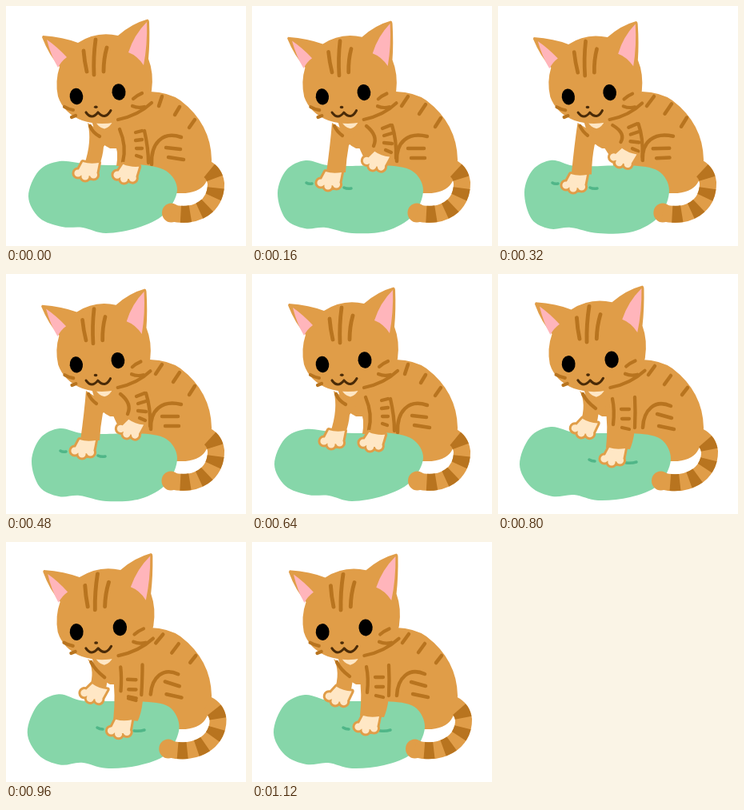
Recreate the animation shown at these times as an HTML page with a canvas. Size 300 by 300 pixels, loop 1.28 s.

```html
<!DOCTYPE html>
<html lang="en">
<head>
<meta charset="utf-8">
<title>Kneading kitten</title>
<style>
  html, body { margin: 0; width: 100%; height: 100%; overflow: hidden; background: #fff; }
  canvas { display: block; width: 300px; height: 300px; }
</style>
</head>
<body>
<canvas id="stage" width="300" height="300"></canvas>
<script>
const ctx = document.getElementById("stage").getContext("2d");
const FUR = "#e09d48", STRIPE = "#b8741f", CREAM = "#ffe7c5";
const PINK = "#ffb5bb", CUSHION = "#86d6a9", DENT = "#50b688", INK = "#000", MOUTH = "#4a2b08";
const STEP = 160;

// Each pose field has the same layout in every pose, so poses can be blended.
const rest = {
  cushion: "28 238 41 206 67 194 98 197 128 199 165 198 200 206 214 230 198 260 165 277 125 284 96 277 70 276 42 265",
  tail: "M206.5 258.5 C238 266 263 250 262.5 222 Q261 209 250 203",
  armL: "M102 146 Q108 168 98 198 L117 198 Q121 188 122 176 L130 165 Z",
  armR: "M136 165 Q141 185 138 200 L166 200 Q171 180 174 165 Z",
  pawL: "99 209 0",
  pawR: "148 212 0.1",
  marks: "M105 150 Q108 158 117 163 M142 154 Q151 175 146 195 M173 156 Q178 178 178 196 " +
    "M162 158 L170 156 M162 168 L170 167 M163 178 L170 178 M163 187 L169 189",
  back: "M195 113 L191 125 M217 126 L211 136 M236 142 L229 152",
  haunch: "M182 198 C181 172 195 156 219 164 M200 177 L218 179 M203 189 L222 192"
};
const pressLeft = {
  cushion: "32 234 43 205 67 193 94 199 122 200 165 199 200 206 214 230 201 262 168 281 125 284 92 277 66 278 42 266",
  tail: "M206 258.5 C238 266 263 250 262.5 221 Q261 208 250 202",
  armL: "M100 146 Q98 172 93 208 L117 208 Q118 190 121 174 L130 165 Z",
  armR: "M130 168 Q136 182 141 192 L165 190 Q172 178 174 165 Z",
  pawL: "95 221 0",
  pawR: "152 196 0.3",
  marks: "M103 150 Q106 157 113 162 M143 150 Q158 162 152 175 M175 149 Q181 168 180 190 " +
    "M163 153 L173 149 M165 162 L175 159 M165 171 L175 172 M167 180 L174 183",
  back: "M195 113 L187 125 M217 123 L209 135 M236 140 L229 151",
  haunch: "M181 194 C180 170 195 157 219 163 M195 178 L215 178 M199 190 L216 190",
  dents: "M68 221 Q71 223 75 222 M115 227 Q119 229 124 228"
};
const pressRight = {
  cushion: "27 238 40 204 66 191 95 198 128 199 168 199 203 206 216 232 200 264 165 279 125 283 95 276 68 278 41 266",
  tail: "M203.5 258.5 C237 267 265 250 264.5 222 Q263 209 251 203",
  armL: "M102 146 Q111 162 103 186 L122 190 Q125 182 126 172 L130 165 Z",
  armR: "M134 165 Q138 190 135 217 L165 219 Q173 200 172 165 Z",
  pawL: "105 195 0.25",
  pawR: "142 231 0",
  marks: "M106 150 Q111 160 122 168 M143 156 Q146 170 144 188 M171 154 Q172 172 171 192 " +
    "M154 169 L164 169 M155 181 L164 181 M155 192 L164 194 M155 192 L164 194",
  back: "M196 115 L188 126 M216 127 L208 138 M237 142 L230 151",
  haunch: "M181 192 C182 170 196 156 216 165 M199 175 L217 180 M201 190 L220 194",
  dents: "M114 232 Q117 234 121 234 M160 236 Q167 237 173 235"
};
const depth = [0, 1, 1.25, 1];

function mix(a, b, t) {
  const goal = b.match(/[\d.]+/g);
  let i = 0;
  return a.replace(/[\d.]+/g, n => (+n + (goal[i++] - n) * t).toFixed(3));
}

function fill(d, color) {
  ctx.fillStyle = color;
  ctx.fill(new Path2D(d));
}

function line(d, color, width, cap = "round") {
  ctx.strokeStyle = color;
  ctx.lineWidth = width;
  ctx.lineCap = cap;
  ctx.lineJoin = "round";
  ctx.stroke(new Path2D(d));
}

function oval(x, y, rx, ry, turn, color) {
  ctx.fillStyle = color;
  ctx.beginPath();
  ctx.ellipse(x, y, rx, ry, turn, 0, Math.PI * 2);
  ctx.fill();
}

// Closed smooth curve through a ring of points.
function ring(text) {
  const v = text.split(" ").map(Number), n = v.length;
  const at = i => [v[(2 * i + n) % n], v[(2 * i + 1 + n) % n]];
  let d = "M" + at(0);
  for (let i = 0; i < n / 2; i++) {
    const [p, q, r, s] = [i - 1, i, i + 1, i + 2].map(at);
    const c1 = q.map((k, j) => k + (r[j] - p[j]) / 6);
    const c2 = r.map((k, j) => k - (s[j] - q[j]) / 6);
    d += `C${c1} ${c2} ${r}`;
  }
  return d + "Z";
}

function paw(text) {
  const [x, y, turn] = text.split(" ").map(Number);
  const shape = new Path2D("M-3 -14 Q6 -11 17 -13 L14 2 L0 4 L-11 1 Z");
  for (const [cx, cy, r] of [[-9, 0, 4.6], [0, 4, 4.6], [10.5, 2, 4.6]]) {
    shape.moveTo(cx + r, cy);
    shape.arc(cx, cy, r, 0, Math.PI * 2);
  }
  ctx.save();
  ctx.translate(x, y);
  ctx.rotate(turn);
  ctx.strokeStyle = FUR;
  ctx.lineWidth = 6;
  ctx.lineJoin = "round";
  ctx.stroke(shape);
  ctx.fillStyle = CREAM;
  ctx.fill(shape);
  ctx.restore();
}

function tail(d) {
  const [x, y] = d.match(/[\d.]+/g);
  oval(+x, +y, 11.5, 12, 0, FUR);
  line(d, FUR, 21, "butt");
  ctx.setLineDash([0, 12, 12, 12, 12, 13, 12, 12, 12, 99]);
  line(d, STRIPE, 21, "butt");
  ctx.setLineDash([]);
}

function head(lean) {
  ctx.save();
  ctx.translate(113, 140);
  ctx.transform(1 - 0.016 * lean, 0, 0.02 * lean, 1 - 0.016 * lean, 0, 0);
  ctx.translate(-113, -140);

  fill("M111 143 Q115 152 123 153.5 Q130 152 134 143 Z", CREAM);
  fill("M46 37 Q72 39 90 46 Q113 31 140 37 Q157 22 177 16.5 Q179 17 179 20 Q180 45 178 66 " +
    "Q185 84 182 106 Q176 130 152 141 Q122 152 95 143 Q72 134 65 113 Q61 94 67 76 Q54 62 45 39 Z", FUR);
  fill("M51 42 Q64 51 76 64 Q69 69 65 77 Q56 62 51 42 Z", PINK);
  fill("M176 20 Q160 36 153 58 Q164 62 172 74 Q177 48 176 20 Z", PINK);
  line("M97 56 Q98 69 101 82 M112 42 Q109 64 110 86 M126 52 Q122 66 122 82", STRIPE, 4.8);
  line("M73 126 Q78 129 84 130 M82 139 L87 137 M159 116 Q163 112 170 109 " +
    "M158 125 Q165 128 173 126 M140 142 Q165 137 182 121", STRIPE, 4.2);

  oval(88, 113, 8.3, 10.3, -0.1, INK);
  oval(141, 107.5, 8.5, 10.3, -0.1, INK);
  oval(112.3, 126.3, 2.4, 1.8, 0, MOUTH);
  line("M100 133 Q107 143 115 133 Q124 143 131 130.5", MOUTH, 3.1);
  ctx.restore();
}

function draw(now) {
  const beat = Math.floor(now / STEP) % 8;
  const amount = depth[beat % 4], left = beat < 4;
  const goal = left ? pressLeft : pressRight;
  const part = name => mix(rest[name], goal[name], amount);

  ctx.fillStyle = "#fff";
  ctx.fillRect(0, 0, 300, 300);

  fill("M106 140 L112 160 Q120 174 130 178 L138 178 L150 220 L205 234 L216 234 " +
    "Q240 235 249 222 Q257 210 257 192 Q256 147 218 118 Q204 108 180 107 Z", FUR);
  line(part("back"), STRIPE, 4.5);
  line(part("haunch"), STRIPE, 4.5);

  fill(ring(part("cushion")), CUSHION);
  if (amount) line(goal.dents, DENT, 3.5);
  tail(part("tail"));

  fill(part("armL"), FUR);
  fill(part("armR"), FUR);
  line(part("marks"), STRIPE, 4.3);
  paw(part("pawL"));
  paw(part("pawR"));

  head(left ? amount : -amount);
}

const start = performance.now();
function tick() {
  draw(performance.now() - start);
  requestAnimationFrame(tick);
}
tick();
</script>
</body>
</html>
```
